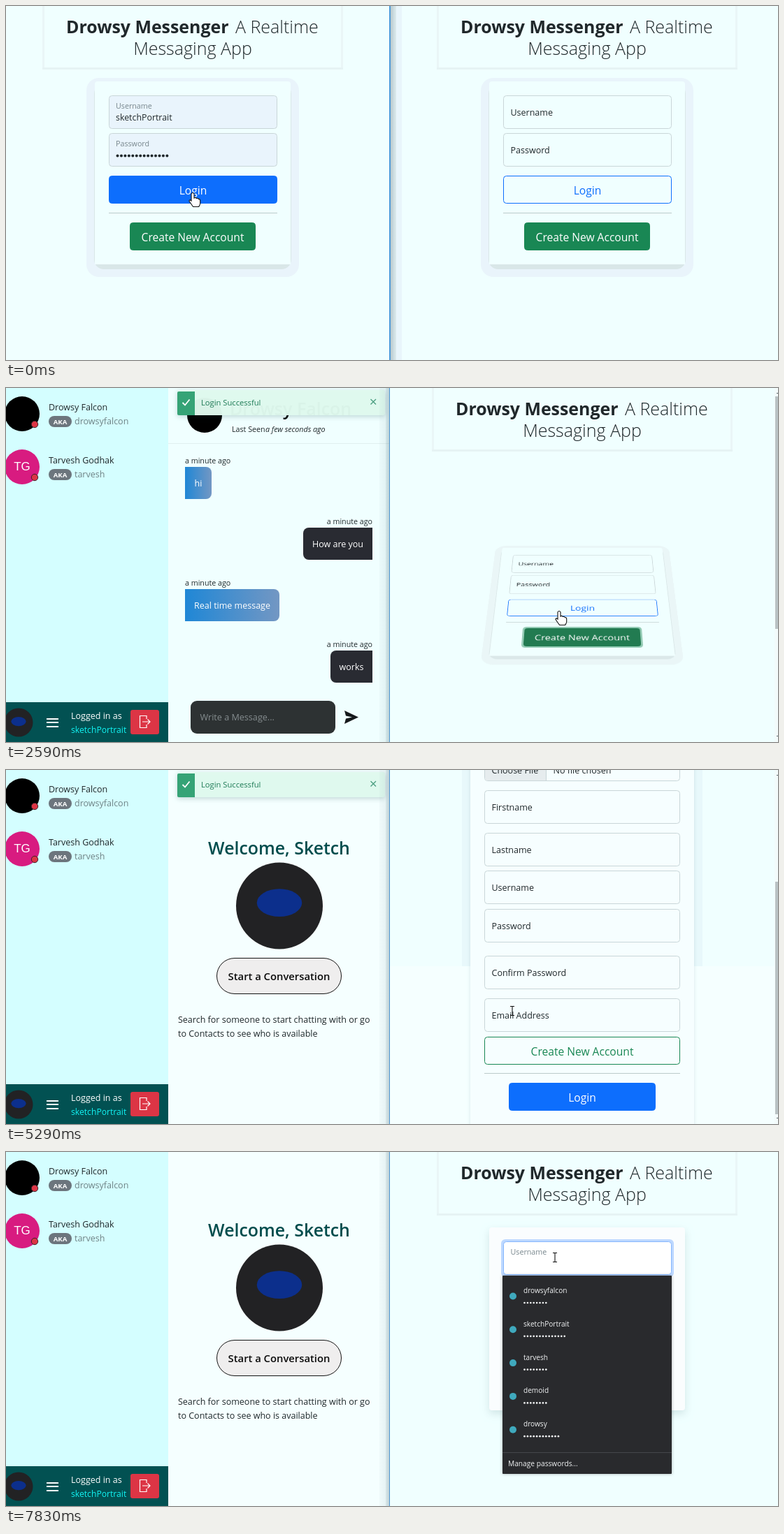
Recreate the animation shown at these times as an HTML page with a canvas. Size 1104x507 px, loop 8 s.

```html
<!DOCTYPE html>
<html lang="en">
<head>
<meta charset="utf-8">
<title>Drowsy Messenger</title>
<style>
html, body { margin: 0; width: 100%; height: 100%; overflow: hidden; background: #f0ffff; }
canvas { display: block; }
</style>
</head>
<body>
<canvas id="stage" width="1104" height="507"></canvas>
<script>
const W = 1104, H = 507, LOOP = 8000;
const screen2d = document.getElementById('stage').getContext('2d');
const sheet = document.createElement('canvas');
sheet.width = W;
sheet.height = 800;
const sheet2d = sheet.getContext('2d');
let g = screen2d;

const INK = '#20282b', PAGE = '#f0ffff', PALE = '#f5ffff', LINE = '#c9d6d8';
const BLUE = { base: '#0d6efd', dark: '#0b5ed7', ring: 'rgba(13,110,253,.36)' };
const GREEN = { base: '#198754', dark: '#157347', ring: 'rgba(25,135,84,.45)' };

const clamp = v => Math.max(0, Math.min(1, v));
const prog = (t, a, b) => clamp((t - a) / (b - a));
const ease = p => p * p * (3 - 2 * p);
const mix = (a, b, p) => a + (b - a) * p;
const within = (x, y, l, t, r, b) => x >= l && x <= r && y >= t && y <= b;

function text(s, x, y, px, color = INK, weight = '400', align = 'left') {
  g.font = `${weight} ${px}px "Open Sans", "Noto Sans", sans-serif`;
  g.textAlign = align;
  g.fillStyle = color;
  g.fillText(s, x, y);
}

function rect(x, y, w, h, color) {
  g.fillStyle = color;
  g.fillRect(x, y, w, h);
}

function box(x, y, w, h, r, fill, stroke) {
  const i = stroke ? 0.5 : 0;
  g.beginPath();
  g.roundRect(x + i, y + i, w - 2 * i, h - 2 * i, r);
  if (fill) { g.fillStyle = fill; g.fill(); }
  if (stroke) { g.strokeStyle = stroke; g.lineWidth = 1; g.stroke(); }
}

function disc(x, y, r, fill, stroke) {
  g.beginPath();
  g.arc(x, y, r, 0, 7);
  g.fillStyle = fill;
  g.fill();
  if (stroke) { g.strokeStyle = stroke; g.lineWidth = 1; g.stroke(); }
}

function line(d, color, width) {
  g.strokeStyle = color;
  g.lineWidth = width;
  g.stroke(new Path2D(d));
}

function fade(x0, x1, from, to) {
  const k = g.createLinearGradient(x0, 0, x1, 0);
  k.addColorStop(0, from);
  k.addColorStop(1, to);
  return k;
}

function faded(alpha, draw) {
  if (alpha <= 0) return;
  g.save();
  g.globalAlpha *= alpha;
  draw();
  g.restore();
}

function dots(n, x, y, step, r, color) {
  for (let i = 0; i < n; i++) disc(x + i * step, y, r, color);
}

function button(x, y, w, h, label, tone, { fill = true, dark = false, ring = false } = {}) {
  if (ring) box(x - 3, y - 3, w + 6, h + 6, 6, tone.ring);
  const color = dark ? tone.dark : tone.base;
  box(x, y, w, h, 4, fill ? color : ring ? PAGE : null, color);
  text(label, x + w / 2, y + 26.5, 15.6, fill ? '#fff' : color, '400', 'center');
}

function field(x, y, w, label, fill) {
  box(x, y, w, 48, 4, fill, LINE);
  text(label, x + 10.5, y + 29, 12.5);
}

function pageHeader(dx) {
  rect(dx + 52, 0, 3, 91, '#eaf6f7');
  rect(dx + 479, 0, 3, 91, '#eaf6f7');
  rect(dx + 52, 88, 430, 3, '#e6f3f4');
  text('Drowsy Messenger', dx + 86, 39, 24.9, INK, '700');
  text('A Realtime', dx + 328, 39, 25, INK, '300');
  text('Messaging App', dx + 267, 70, 25, INK, '300', 'center');
}

function loginCard(dx, o) {
  g.save();
  g.translate(dx, 0);
  if (o.soft) {
    g.save();
    g.shadowColor = 'rgba(0,60,70,.13)';
    g.shadowBlur = 12;
    g.shadowOffsetY = 5;
    box(127, 108, 280, 262, 4, '#fafdfe');
    g.restore();
  } else {
    box(115, 103, 304, 285, 18, o.flat ? '#e9f6f7' : '#e9f4fb');
    box(126, 112, 282, 265, 14, '#d9e7e8');
    box(127, 108, 280, 262, [4, 4, 0, 0], PAGE);
  }
  if (o.typed) {
    for (const y of [128, 182]) box(147, y, 241, 48, 4, '#e9f4fc', LINE);
    text('Username', 157, 147, 10.7, '#77868c');
    text('sketchPortrait', 157, 164, 12.4);
    text('Password', 157, 201, 10.7, '#77868c');
    dots(14, 159.5, 214.5, 5.45, 2, INK);
  } else {
    if (o.focus) {
      box(144, 125, 247, 54, 6, 'rgba(13,110,253,.26)');
      box(147, 128, 241, 48, 4, '#fff', '#86b7fe');
      text('Username', 157.5, 147, 10.7, '#77868c');
      if (o.caret) rect(157, 150, 1, 17, INK);
    } else field(147, 128, 241, 'Username');
    field(147, 182, 241, 'Password');
  }
  button(147, 243, 241, 40, 'Login', BLUE, o.login);
  rect(147, 296, 241, 1, '#bccaca');
  button(177, 310, 180, 40, 'Create New Account', GREEN, o.create);
  g.restore();
}

function star(x, y) {
  g.beginPath();
  for (let i = 0; i < 16; i++) {
    const a = i * Math.PI / 8, r = i % 2 ? 3 : 6.5;
    g.lineTo(x + r * Math.sin(a), y - r * Math.cos(a));
  }
  g.fillStyle = '#fff';
  g.fill();
}

function signupCard(o) {
  faded(o.halo, () => box(652, 103, 344, 404, [18, 18, 0, 0], '#e8f8fb'));
  g.save();
  g.shadowColor = 'rgba(0,60,70,.12)';
  g.shadowBlur = 5;
  box(664, 108, 320, 692, 4, o.card);
  g.restore();
  disc(824, 153, 24.7, '#64ae3e');
  star(824, 153);
  text('Select your Account Picture (Optional)', 684, 199, 12.5);
  box(684, 210, 280, 32, 4, null, LINE);
  box(685, 211, 87, 30, [3, 0, 0, 3], '#e6ecee');
  rect(772, 211, 1, 30, LINE);
  text('Choose File', 694.5, 231, 12.5);
  text('No file chosen', 782.5, 231, 12.5);
  const rows = { Firstname: 255, Lastname: 316, Username: 370.5, Password: 425, 'Confirm Password': 492, 'Email Address': 553.5 };
  for (const name in rows) field(684, Math.floor(rows[name]), 280, name);
  button(684, 608, 280, 40, 'Create New Account', GREEN, { fill: false });
  rect(684, 660, 280, 1, '#bccaca');
  button(719, 674, 210, 40, 'Login', BLUE, o.login);
}

// Leans a card back: k = 0 faces the viewer, k = 1 lies almost flat.
function tilt(k, cx, half, top, bottom, draw) {
  if (k <= 0) return draw();
  sheet2d.clearRect(0, 0, W, sheet.height);
  g = sheet2d;
  draw();
  g = screen2d;
  const h = bottom - top, y0 = top + h * 0.856 * k, y1 = bottom + 16 * k;
  const s0 = 1 - 0.368 * k, s1 = 1 - 0.08 * k;
  const src = v => top + h * v * s1 / mix(s0, s1, v);
  faded(1 - 0.9 * k ** 4, () => {
    for (let y = Math.round(y0); y < y1; y++) {
      const v = (y - y0) / (y1 - y0), s = mix(s0, s1, v);
      const a = src(clamp(v)), b = src(clamp(v + 1 / (y1 - y0)));
      g.drawImage(sheet, cx - half, a, 2 * half, Math.max(0.5, b - a), cx - half * s, y, 2 * half * s, 1);
    }
  });
}

function avatar(x, y, r) {
  disc(x, y, r, '#222224');
  g.beginPath();
  g.ellipse(x, y - r * 0.07, r * 0.52, r * 0.32, 0, 0, 7);
  g.fillStyle = '#0c2f8c';
  g.fill();
}

function contact(y, name, user, drawFace) {
  if (drawFace) drawFace();
  disc(41, y + 52, 4.7, '#dc3545', '#3b2026');
  text(name, 61, y + 32, 12.5);
  box(61, y + 40, 33, 16, 8, '#6c757d');
  text('AKA', 77.5, y + 51.7, 9.6, '#fff', '700', 'center');
  text(user, 98, y + 52, 12.5, '#6f8285');
}

function sidebar(t, hot) {
  rect(0, 0, 232, H, '#d4feff');
  if (hot === 'first') rect(0, 0, 232, 75, '#a0ffff');
  if (hot === 'second') rect(0, 75, 232, 76, '#a0ffff');
  contact(0, 'Drowsy Falcon', 'drowsyfalcon', () => disc(23, 37, 25, '#000'));
  contact(76, 'Tarvesh Godhak', 'tarvesh', t >= 1610 && (() => {
    disc(23, 113, 25, '#d81b80');
    g.font = '17px "Liberation Sans", Arial, sans-serif';
    g.textAlign = 'center';
    g.fillStyle = '#fff';
    g.fillText('TG', 23, 118);
  }));
  rect(0, 450, 232, 57, '#025152');
  avatar(18, 479, 20.5);
  for (const y of [473, 478, 484]) rect(58, y, 17, 2, '#fff');
  text('Logged in as', 93, 474, 12.5, '#fff');
  text('sketchPortrait', 93, 494, 12.2, '#12f4f4');
  box(178, 461, 41, 35, 3, '#dc3545');
  line('M201 474V469.5H191.5V486.5H201V482M195 478H206M202.5 474.5L206 478L202.5 481.5', '#fff', 1.2);
}

function message(x, y, w, s, mine) {
  text('a minute ago', mine ? 524 : 256, y - 5, 10.7, INK, '400', mine ? 'right' : 'left');
  const fill = mine ? '#292b32' : fade(x, x + w, '#1f87d6', '#7397c3');
  box(x, y, w, 46, mine ? [8, 0, 0, 8] : [0, 8, 8, 0], fill);
  text(s, x + w / 2, y + 28, 12.5, '#fff', '400', 'center');
}

function chat(t) {
  rect(232, 0, 317, H, PAGE);
  rect(232, 79, 317, 1, '#e0f0f0');
  disc(284, 39, 25, '#000');
  text('Drowsy Falcon', 320, 39, 25, '#0b0d0e', '600');
  text('Last Seen', 323, 63, 10.7);
  text('a few seconds ago', 371, 63, 10.7, INK, 'italic 400');
  if (t >= 1690) {
    message(256, 113, 38, 'hi', false);
    message(425, 200, 99, 'How are you', true);
    message(256, 288, 135, 'Real time message', false);
    message(464, 376, 60, 'works', true);
  }
  box(264, 448, 207, 47, 9, '#2d3233');
  text('Write a Message...', 277.5, 476, 12.6, '#858d8f');
  g.fillStyle = '#15191b';
  g.fill(new Path2D('M484 462L504 471.5L484 481L486 473.5L495 471.5L486 469.5Z'));
}

function welcome(t) {
  rect(232, 0, 317, H, PALE);
  text('Welcome, Sketch', 390.5, 121, 24.9, '#004d4d', '600', 'center');
  if (t >= 4010) avatar(391, 194.5, 62);
  box(301, 269, 179, 52, 26, '#efeeee', '#141414');
  text('Start a Conversation', 390.5, 301, 14.8, '#0c0c0c', '600', 'center');
  text('Search for someone to start chatting with or go', 246, 362, 12.5);
  text('to Contacts to see who is available', 246, 382, 12.5);
}

function toast(alpha) {
  faded(alpha, () => {
    g.save();
    g.shadowColor = 'rgba(0,60,60,.22)';
    g.shadowBlur = 7;
    g.shadowOffsetY = 2;
    box(245, 3, 297, 36, 3, 'rgba(225,250,239,.97)');
    g.restore();
    box(245, 5, 25, 34, [2, 0, 0, 2], '#35a376');
    line('M252.5 21L256 24.5L262.5 16.5', '#fff', 1.8);
    text('Login Successful', 279, 25, 11.2, '#1d7a55');
    line('M521.5 16L529 23.5M529 16L521.5 23.5', '#4d9f82', 1.4);
  });
}

function scrollbar(scroll) {
  rect(1099, 0, 5, H, '#f3fbfb');
  box(1100, 12 + scroll * 0.655, 4, 333, 0, '#b9c2c4');
  rect(1102, 7, 2, 1, '#59666a');
  rect(1102, 498, 2, 1, '#59666a');
}

function dropdown(alpha) {
  faded(alpha, () => {
    g.save();
    g.shadowColor = 'rgba(0,0,0,.3)';
    g.shadowBlur = 4;
    box(710, 177, 242, 284, 1, '#292a2d');
    g.restore();
    const rows = [['drowsyfalcon', 8], ['sketchPortrait', 14], ['tarvesh', 8], ['demoid', 8], ['drowsy', 12]];
    rows.forEach(([name, n], i) => {
      const y = 47.8 * i;
      disc(725, 206.5 + y, 5, '#3fa9bd');
      text(name, 740, 202 + y, 10.1, '#f1f3f4');
      dots(n, 741.5, 216 + y, 4.4, 1.35, '#f1f3f4');
    });
    rect(710, 430, 242, 1, '#45474b');
    text('Manage passwords...', 718, 449.5, 10.2, '#f1f3f4');
  });
}

function divider(leftOnTop) {
  if (leftOnTop) {
    rect(557, 0, 9, H, '#e8f5fb');
    rect(549, 0, 9, H, fade(549, 558, '#b4c5ca', '#dcebee'));
    rect(548, 0, 2, H, '#4f9cda');
  } else {
    rect(534, 0, 14, H, fade(534, 548, 'rgba(60,100,115,.03)', 'rgba(60,100,115,.1)'));
    rect(543, 0, 5, H, fade(543, 548, 'rgba(60,100,115,.08)', 'rgba(60,100,115,.2)'));
    rect(548, 0, 1, H, '#4d94cf');
  }
}

// Pointer legs: start, end, x, y
const legs = [[740, 1300, 765, 370], [1760, 2150, 791, 320], [3030, 3600, 145, 43], [4380, 4830, 724, 345],
  [5880, 6250, 764, 466], [6450, 6680, 775, 368], [6750, 7080, 785, 151]];

function pointer(t) {
  let x = 267, y = 268;
  for (const [a, b, px, py] of legs) {
    const p = ease(prog(t, a, b));
    x = mix(x, px, p);
    y = mix(y, py, p);
  }
  return [x, y];
}

const isSignup = t => t >= 2690 && t < 6540;
const scrollAt = t => t < 6540 ? 226 * ease(prog(t, 5070, 5280)) + (t >= 5400 ? 1 : 0) : 0;

function spotAt(x, y, t) {
  if (x < 549 && t >= 1390) {
    if (x < 232 && y < 151) return y < 75 ? 'first' : 'second';
    return within(x, y, 264, 449, 471, 494) && t < 3900 ? 'field' : '';
  }
  if (x >= 549 && isSignup(t)) {
    const v = y + scrollAt(t);
    if (within(x, v, 719, 674, 928, 714)) return 'login';
    return within(x, v, 684, 255, 964, 601) ? 'field' : '';
  }
  const u = x < 549 ? x : x - (t >= 2590 && t < 6540 ? 557 : 564);
  if (within(u, y, 147, 243, 388, 283)) return 'login';
  if (within(u, y, 177, 310, 357, 350)) return 'create';
  return within(u, y, 147, 128, 388, 230) ? 'field' : '';
}

const ARROW = new Path2D('M0 0V13.4L3.1 10.5L5.3 15.4L7.6 14.4L5.4 9.6H9.5Z');
const HAND = new Path2D('M-2 1Q0 -2 2 1V7Q4 5.5 5.3 7.5Q7.4 6.6 8.3 8.6Q10.6 8.2 10.7 11V15Q10 18 8.6 19.5H0.6Q-2 16 -5 11.5Q-5 8.5 -2 11Z');
const BEAM = new Path2D('M-3 -6.5H3M0 -6.5V6.5M-3 6.5H3');

function drawPointer(x, y, spot) {
  g.save();
  g.translate(x, y);
  g.lineWidth = 1.1;
  g.strokeStyle = '#111';
  g.fillStyle = '#fff';
  if (spot === 'field') g.stroke(BEAM);
  else {
    const shape = spot ? HAND : ARROW;
    g.fill(shape);
    g.stroke(shape);
  }
  g.restore();
}

function leftWindow(t, spot, x) {
  if (t < 1390) {
    rect(0, 0, 549, H, PAGE);
    pageHeader(0);
    const over = spot === 'login' && x < 549;
    loginCard(0, { typed: true, login: { fill: over, dark: over && t >= 590, ring: t >= 590 } });
    return;
  }
  (t < 3900 ? chat : welcome)(t);
  sidebar(t, spot);
  toast(prog(t, 1850, 2080) * (1 - prog(t, 5700, 6050)));
}

function rightWindow(t, spot, x) {
  const hot = x >= 549 ? spot : '';
  const scroll = scrollAt(t), signup = isSignup(t), wide = t < 2590 || t >= 6540;
  g.save();
  g.beginPath();
  g.rect(549, 0, 555, H);
  g.clip();
  rect(549, 0, 555, H, PAGE);
  if (signup) {
    if (scroll) rect(549, H - scroll, 555, scroll, t < 5900 ? PALE : '#f9fdfe');
    g.save();
    g.translate(0, -scroll);
    pageHeader(557);
    const k = Math.max(1 - ease(prog(t, 2690, 2850)), ease(prog(t, 6430, 6540)));
    tilt(t < 2690 ? 0 : k, 824, 172, 103, 800, () => signupCard({
      halo: ease(prog(t, 3030, 3200)) * (1 - 0.8 * prog(t, 5900, 6200)),
      card: t < 5070 ? '#f3feff' : t < 5900 ? '#f6feff' : '#fafdfe',
      login: { dark: hot === 'login' || t >= 6330, ring: t >= 6330 }
    }));
    g.restore();
  } else {
    const dx = wide ? 564 : 557, late = t >= 6540;
    pageHeader(dx);
    const k = late ? 1 - ease(prog(t, 6540, 6680)) : t < 2590 ? 0 : 0.5 + (t - 2590) / 200;
    const pressed = !late && t >= 2370;
    tilt(k, dx + 267, 152, 103, 388, () => loginCard(dx, {
      soft: late,
      flat: t >= 2590,
      focus: t >= 7330,
      caret: t >= 7400 && t < 7830,
      login: { fill: hot === 'login' },
      create: { dark: hot === 'create' || pressed, ring: pressed }
    }));
    dropdown(prog(t, 7350, 7470));
  }
  if (!wide) scrollbar(scroll);
  g.restore();
}

function draw(t) {
  g = screen2d;
  const [x, y] = pointer(t), spot = spotAt(x, y, t);
  leftWindow(t, spot, x);
  rightWindow(t, spot, x);
  divider(t < 1280 || (t >= 3600 && t < 4780));
  drawPointer(x, y, spot);
}

function tick(now) {
  draw(now % LOOP);
  requestAnimationFrame(tick);
}
draw(0);
requestAnimationFrame(tick);
</script>
</body>
</html>
```
